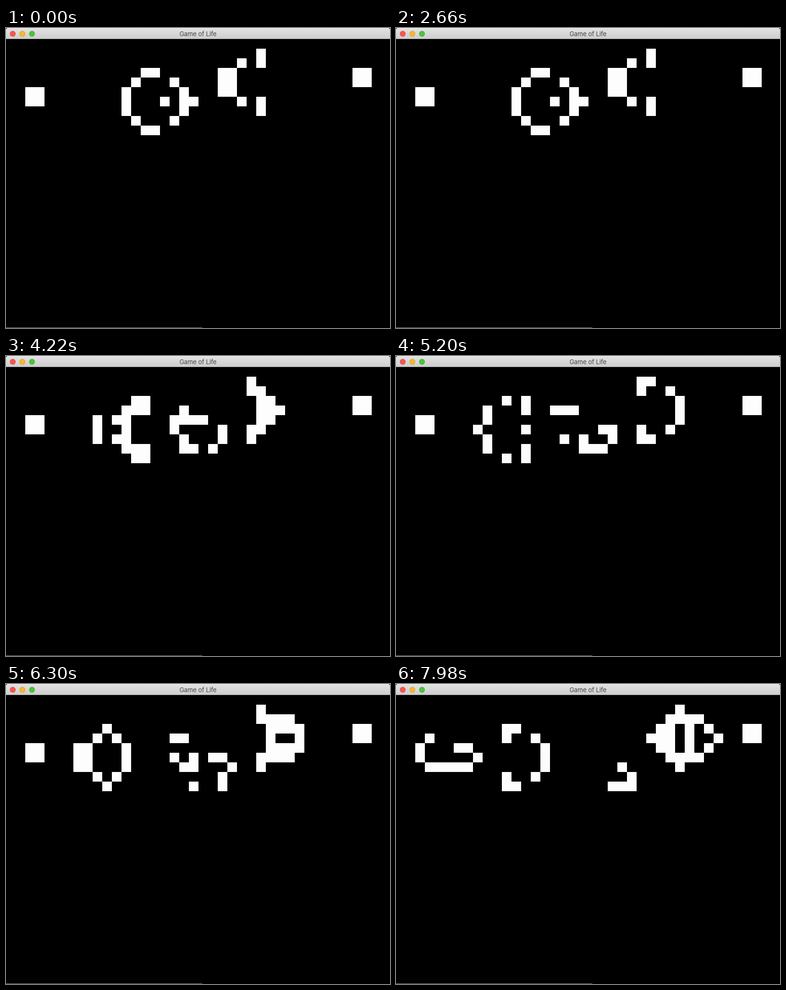
An HTML page with a canvas for the animation above (8 s loop, 798 by 624 pixels).

```html
<!DOCTYPE html>
<html lang="en">
<head>
<meta charset="utf-8">
<title>Game of Life</title>
<style>
  html, body { margin: 0; width: 798px; height: 624px; overflow: hidden; background: #000; }
  .bar {
    position: absolute; top: 0; left: 0; width: 798px; height: 23px; box-sizing: border-box;
    background: linear-gradient(#e2e2e2, #cecece); border-top: 1px solid #eee; border-bottom: 1px solid #a8a8a8;
    border-radius: 4px 4px 0 0;
    font: 13px/23px Inter, sans-serif; letter-spacing: -.1px; text-align: center; color: #444;
  }
  .bar i {
    position: absolute; top: 5px; width: 12px; height: 12px; border-radius: 50%;
    box-shadow: inset 0 0 0 1px #0002;
  }
  canvas { position: absolute; left: 0; top: 23px; }
  .edge { position: absolute; left: 0; top: 623px; width: 408px; height: 1px; background: #888; }
</style>
</head>
<body>
<div class="bar">
  <i style="left:8px;background:#f9564f"></i><i style="left:28px;background:#fab52e"></i><i style="left:48px;background:#4cc43c"></i>
  Game of Life
</div>
<canvas width="798" height="601"></canvas>
<div class="edge"></div>
<script>
const COLS = 40, ROWS = 30, CELL = 20, LOOP = 8000;

// Gosper glider gun
const gun = `
..........................#
........................#.#
..............##......##............##
.............#...#....##............##
..##........#.....#...##
..##........#...#.##....#.#
............#.....#.......#
.............#...#
..............##`.split('\n');

// When each new generation appears, in ms
const ticks = [2780, 3060, 3340, 3630, 3910, 4210, 4480, 4760, 5030, 5340,
               5660, 5990, 6290, 6560, 6840, 7130, 7420, 7680, 7980];

const makeGrid = rule =>
  Array.from({ length: ROWS }, (_, y) => Array.from({ length: COLS }, (_, x) => rule(x, y)));

function step(grid) {
  return makeGrid((x, y) => {
    let near = 0;
    for (let dy = -1; dy <= 1; dy++)
      for (let dx = -1; dx <= 1; dx++)
        if (dx || dy) near += grid[y + dy]?.[x + dx] ? 1 : 0;
    return near === 3 || (near === 2 && grid[y][x]);
  });
}

const generations = [makeGrid((x, y) => gun[y]?.[x] === '#')];
for (const _ of ticks) generations.push(step(generations.at(-1)));

const ctx = document.querySelector('canvas').getContext('2d');
let shown = -1;

function draw() {
  const time = performance.now() % LOOP;
  const current = ticks.filter(t => t <= time).length;
  if (current !== shown) {
    shown = current;
    ctx.fillStyle = '#000';
    ctx.fillRect(0, 0, 798, 601);
    ctx.fillStyle = '#fdfdfd';
    generations[current].forEach((row, y) => row.forEach((alive, x) => {
      if (alive) ctx.fillRect(x * CELL, y * CELL, CELL, CELL);
    }));
  }
  requestAnimationFrame(draw);
}
draw();
</script>
</body>
</html>
```
